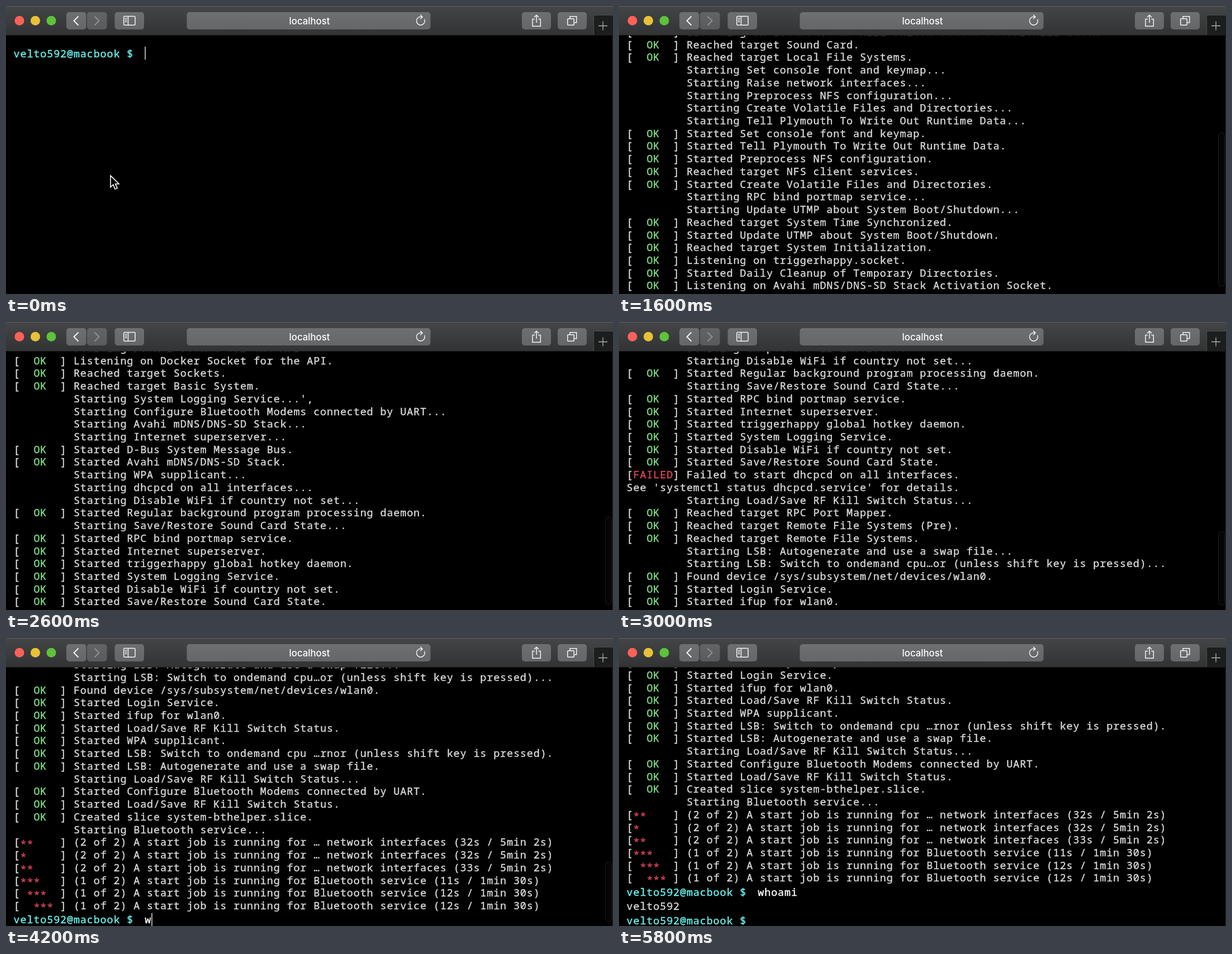
Animation, 1086 px wide and 516 px high, one loop 6000 ms. Source, as an HTML page:

```html
<!DOCTYPE html>
<html lang="en">
<head>
<meta charset="utf-8">
<title>Boot log</title>
<style>
  html, body { margin: 0; width: 100%; height: 100%; overflow: hidden; background: #000; }
  svg { display: block; }
  .term text {
    font: 18.4px "Noto Sans Mono", monospace; letter-spacing: .89px; white-space: pre;
    color: #dadada;
  }
  .term text, .term tspan { fill: currentColor; stroke: currentColor; stroke-width: .4; }
  .term .prompt { color: #6af3ef; }
  .term .cmd { color: #fff; }
  .term .ok { color: #7fdc86; }
  .term .bad { color: #e0475a; }
  .term .star { color: #d8445a; }
  .icon { fill: none; stroke: #f4f4f4; stroke-width: 1.5; }
</style>
</head>
<body>
<svg width="1086" height="516" viewBox="0 0 1086 516">
  <defs>
    <linearGradient id="bar" x2="0" y2="1">
      <stop stop-color="#434546"/><stop offset="1" stop-color="#313334"/>
    </linearGradient>
    <linearGradient id="btn" x2="0" y2="1">
      <stop stop-color="#6d6f70"/><stop offset="1" stop-color="#646667"/>
    </linearGradient>
    <clipPath id="view"><rect y="53" width="1086" height="463"/></clipPath>
  </defs>
  <rect width="1086" height="516"/>
  <g class="term" clip-path="url(#view)">
    <g id="page"></g>
    <rect id="thumb" x="1072.5" width="11" rx="5" fill="#050505" stroke="#1c1c1c"/>
    <path id="mouse" d="M187 304V324.5L191.8 320.2L195 328L199 326.4L195.7 318.8H202Z" stroke="#fff" stroke-width="1.6"/>
  </g>
  <path d="M1085.5 52V516" stroke="#2c2c2c"/>

  <rect width="1086" height="52" fill="url(#bar)"/>
  <path d="M0 .5H1086" stroke="#5c5e5f"/>
  <path d="M0 52.5H1086" stroke="#151515"/>
  <circle cx="24" cy="26.3" r="8.5" fill="#fc6159"/>
  <circle cx="52.5" cy="26.3" r="8.5" fill="#e8c137"/>
  <circle cx="81" cy="26.3" r="8.5" fill="#5fc23b"/>
  <g fill="url(#btn)">
    <rect x="108" y="11" width="35.5" height="31" rx="5"/>
    <rect x="145" y="11" width="35.5" height="31" rx="5" opacity=".75"/>
    <rect x="194.5" y="11" width="52.5" height="31" rx="5"/>
    <rect x="323.5" y="11" width="436" height="31" rx="5"/>
    <rect x="923" y="11" width="52" height="31" rx="5"/>
    <rect x="987" y="11" width="52" height="31" rx="5"/>
  </g>
  <path d="M1051.5 52V16.5H1086" fill="none" stroke="#4b4d4e"/>
  <rect x="1052" y="17" width="34" height="35" fill="#1c1d1d"/>
  <path d="M1060 35.5H1076M1068 27.5V43.5" stroke="#b0b1b1" stroke-width="1.3"/>
  <g class="icon">
    <path d="M129.5 18.5L121.5 26.5L129.5 34.5" stroke-width="2"/>
    <path d="M158.5 18.5L166.5 26.5L158.5 34.5" stroke="#8e9091" stroke-width="2"/>
    <rect x="210.7" y="18.5" width="20.3" height="15.8" rx="1.5"/>
    <path d="M218.5 18.5V34.3M212.8 22.2H216.4M212.8 25.2H216.4M212.8 28.2H216.4"/>
    <path d="M748.7 23.8A7.4 7.4 0 1 1 742 19.3L744.5 19.5M741.2 15.8L745 19.5L741.2 23.2"/>
    <path d="M946 23.5H942V36.3H956.3V23.5H952.3M949.1 30V16.5M945 20.3L949.1 16.2L953.2 20.3"/>
    <rect x="1004.7" y="22.7" width="11.5" height="11.5" rx="1"/>
    <path d="M1009 22.5V18.7H1020.7V29.7H1016.5"/>
  </g>
  <text x="543" y="33" text-anchor="middle" fill="#fff" font-size="16.8" font-weight="500" font-family="Inter, sans-serif">localhost</text>
</svg>

<script>
// Line prefixes: + OK, - starting, ! failed, = plain, digits: offset and count of stars
const LOG = `+Started Show Plymouth Boot Screen.
+Reached target Encrypted Volumes.
+Reached target Paths.
+Started Forward Password Requests to Plymouth Directory Watch.
+Found device /dev/serial1.
+Found device /dev/mmcblk0p1.
-Starting File System Check on /dev/mmcblk0p1...
+Started File System Check on /dev/mmcblk0p1.
-Mounting /boot...
+Mounted /boot.
+Listening on Load/Save RF Kill Switch Status /dev/rfkill Watch.
+Reached target Sound Card.
+Reached target Local File Systems.
-Starting Set console font and keymap...
-Starting Raise network interfaces...
-Starting Preprocess NFS configuration...
-Starting Create Volatile Files and Directories...
-Starting Tell Plymouth To Write Out Runtime Data...
+Started Set console font and keymap.
+Started Tell Plymouth To Write Out Runtime Data.
+Started Preprocess NFS configuration.
+Reached target NFS client services.
+Started Create Volatile Files and Directories.
-Starting RPC bind portmap service...
-Starting Update UTMP about System Boot/Shutdown...
+Reached target System Time Synchronized.
+Started Update UTMP about System Boot/Shutdown.
+Reached target System Initialization.
+Listening on triggerhappy.socket.
+Started Daily Cleanup of Temporary Directories.
+Listening on Avahi mDNS/DNS-SD Stack Activation Socket.
+Listening on D-Bus System Message Bus Socket.
+Started Daily apt download activities.
+Started Daily apt upgrade and clean activities.
+Reached target Timers.
-Starting Docker Socket for the API.
+Listening on Docker Socket for the API.
+Reached target Sockets.
+Reached target Basic System.
-Starting System Logging Service...',
-Starting Configure Bluetooth Modems connected by UART...
-Starting Avahi mDNS/DNS-SD Stack...
-Starting Internet superserver...
+Started D-Bus System Message Bus.
+Started Avahi mDNS/DNS-SD Stack.
-Starting WPA supplicant...
-Starting dhcpcd on all interfaces...
-Starting Disable WiFi if country not set...
+Started Regular background program processing daemon.
-Starting Save/Restore Sound Card State...
+Started RPC bind portmap service.
+Started Internet superserver.
+Started triggerhappy global hotkey daemon.
+Started System Logging Service.
+Started Disable WiFi if country not set.
+Started Save/Restore Sound Card State.
!Failed to start dhcpcd on all interfaces.
=See 'systemctl status dhcpcd.service' for details.
-Starting Load/Save RF Kill Switch Status...
+Reached target RPC Port Mapper.
+Reached target Remote File Systems (Pre).
+Reached target Remote File Systems.
-Starting LSB: Autogenerate and use a swap file...
-Starting LSB: Switch to ondemand cpu…or (unless shift key is pressed)...
+Found device /sys/subsystem/net/devices/wlan0.
+Started Login Service.
+Started ifup for wlan0.
+Started Load/Save RF Kill Switch Status.
+Started WPA supplicant.
+Started LSB: Switch to ondemand cpu …rnor (unless shift key is pressed).
+Started LSB: Autogenerate and use a swap file.
-Starting Load/Save RF Kill Switch Status...
+Started Configure Bluetooth Modems connected by UART.
+Started Load/Save RF Kill Switch Status.
+Created slice system-bthelper.slice.
-Starting Bluetooth service...
02(2 of 2) A start job is running for … network interfaces (32s / 5min 2s)
01(2 of 2) A start job is running for … network interfaces (32s / 5min 2s)
02(2 of 2) A start job is running for … network interfaces (33s / 5min 2s)
03(1 of 2) A start job is running for Bluetooth service (11s / 1min 30s)
13(1 of 2) A start job is running for Bluetooth service (12s / 1min 30s)
23(1 of 2) A start job is running for Bluetooth service (12s / 1min 30s)`.split("\n");

const USER = "velto592";
const STEP = 200, LOOP = 6000;
const LEFT = 13.6, CMD = 248.3, CELL = 11.93;
const TOP = 117, ROW = 22.73, GAP = 25.5;
const STAR_DROP = 3.5;              // centres the asterisks on the row
const SHOWN = [0, 0, 0, 4, 9, 14, 20, 25, 31, 36, 41, 46, 51, 56, 62, 67, 72, 77, 82];
const BOOT = ["", "bo", "boot"];
const WHO = ["", "", "w", "who", "whoam", "whoami"];
const ASK = 19, DONE = 25;          // steps of the second and third prompt

const $ = id => document.getElementById(id);
const page = $("page");
const show = (el, on) => el.setAttribute("visibility", on ? "visible" : "hidden");

function make(tag, attrs, parent = page, text = "") {
  const el = document.createElementNS("http://www.w3.org/2000/svg", tag);
  for (const k in attrs) el.setAttribute(k, attrs[k]);
  el.textContent = text;
  return parent.appendChild(el);
}

// Each segment is [text, class, vertical shift]
function segments(line) {
  const body = line.slice(1);
  switch (line[0]) {
    case "+": return [["[  "], ["OK", "ok"], ["  ] " + body]];
    case "-": return [[" ".repeat(9) + body]];
    case "!": return [["["], ["FAILED", "bad"], ["] " + body]];
    case "=": return [[body]];
  }
  const pad = +line[0], n = +line[1];
  return [["[" + " ".repeat(pad)], ["*".repeat(n), "star", STAR_DROP],
          [" ".repeat(6 - pad - n) + "] " + line.slice(2), "", -STAR_DROP]];
}

function addPrompt(y) {
  return {
    y,
    label: make("text", { x: LEFT, y, class: "prompt" }, page, USER + "@macbook $"),
    cmd: make("text", { x: CMD, y, class: "cmd" })
  };
}

const rowY = i => TOP + i * ROW;
const rows = LOG.map((line, i) => {
  const el = make("text", { x: LEFT, y: rowY(i) });
  for (const [text, cls = "", dy = 0] of segments(line)) make("tspan", { class: cls, dy }, el, text);
  return el;
});
const askY = rowY(LOG.length - 1) + GAP;
const prompts = [addPrompt(91.5), addPrompt(askY), addPrompt(askY + 2 * GAP)];
const answer = make("text", { x: LEFT, y: askY + GAP }, page, USER);
const caret = make("rect", { width: 1.6, height: 23, fill: "#d0d0d0" });

function draw(step) {
  const count = SHOWN[Math.min(step, SHOWN.length - 1)];
  const typed = [BOOT[Math.min(step, 2)], WHO[Math.max(0, Math.min(step - ASK, 5))], ""];
  const active = step < ASK ? 0 : step < DONE ? 1 : 2;

  rows.forEach((el, i) => show(el, i < count));
  prompts.forEach((p, i) => {
    show(p.label, i <= active);
    p.cmd.textContent = i <= active ? typed[i] : "";
  });
  show(answer, active === 2);

  const end = active ? prompts[active].y : rowY(count - 1);
  const scroll = Math.max(0, end - [507.5, 511.5, 513][active]);
  page.setAttribute("transform", `translate(0 ${-scroll})`);

  caret.setAttribute("x", CMD + typed[active].length * CELL);
  caret.setAttribute("y", prompts[active].y - 18.5);
  show(caret, step < 3 || (step >= ASK && step < 28));

  const h = 274 * 758 / (463 + scroll);
  $("thumb").setAttribute("y", 511.5 - h * 1.033);
  $("thumb").setAttribute("height", h);
  show($("thumb"), scroll > 0 && (step < 24 || step === 25 || step === 26));
  show($("mouse"), step === 0);
}

let last = -1;
function tick() {
  const step = Math.floor(performance.now() % LOOP / STEP);
  if (step !== last) draw(last = step);
  requestAnimationFrame(tick);
}
tick();
</script>
</body>
</html>
```
